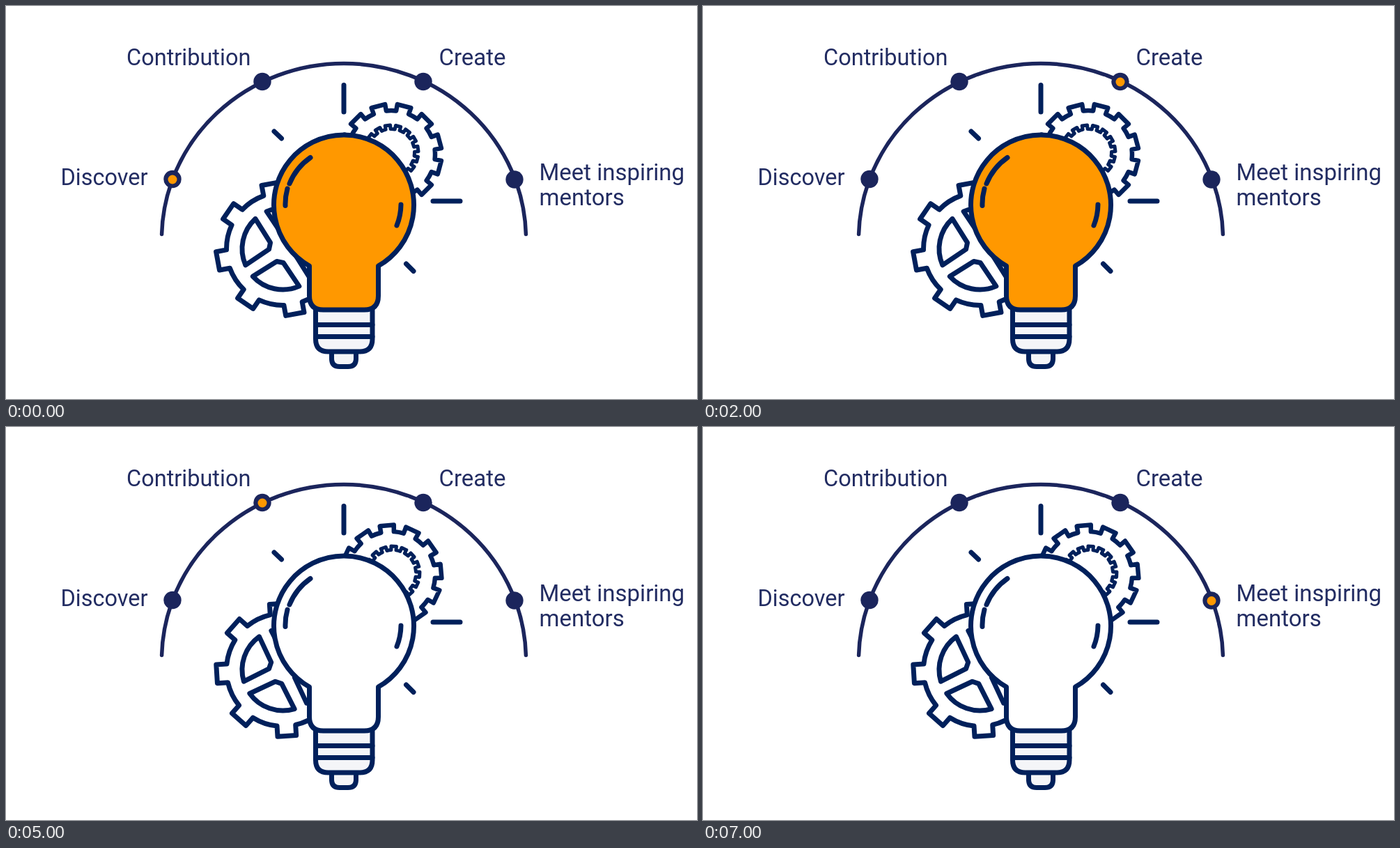
An HTML page for the animation above (8 s loop, 992x564 px).

```html
<!DOCTYPE html>
<html lang="en">
<head>
<meta charset="utf-8">
<title>Bulb and gears</title>
<style>
  html, body { margin: 0; width: 100%; height: 100%; overflow: hidden; background: #fff; }
  svg { display: block; }
  text { font: 33px Roboto, sans-serif; fill: #222c62; }
  .snug { font-size: 32.5px; }
  .ink { fill: none; stroke: #00205b; stroke-width: 7; stroke-linecap: round; stroke-linejoin: round; }
  .gear { fill: #fff; }
  #small { stroke-width: 6.5; }
  #hub { stroke-width: 5; }
</style>
</head>
<body>
<svg width="992" height="564" viewBox="0 0 992 564">
  <path d="M223.6 327.5A261.5 252 0 0 1 746.4 327.5" fill="none" stroke="#1b255c" stroke-width="5.5" stroke-linecap="round"/>
  <g id="dots"></g>
  <circle id="lit" r="6.5" fill="#ff9800"/>

  <text class="snug" x="173" y="85">Contribution</text>
  <text x="621.5" y="85">Create</text>
  <text class="snug" x="78.500" y="257">Discover</text>
  <text x="765.5" y="249.5">Meet inspiring</text>
  <text x="765.5" y="286">mentors</text>

  <path class="ink" d="M485 113.500V152M385 180l10.500 10M613 280H652M574.500 370l10.500 10.500"/>

  <path id="small" class="ink gear"/>
  <path id="hub" class="ink gear"/>
  <path id="big" class="ink gear"/>
  <path id="holes" class="ink gear"/>

  <path class="ink" style="fill:#f4f5f8" d="M467.500 497V506Q467.500 517.500 479 517.500H491Q502.500 517.500 502.500 506V497"/>
  <path class="ink" style="fill:#f4f5f8" d="M444.500 436V478Q444.500 496 462.500 496H508Q526 496 526 478V436"/>
  <path class="ink" d="M445 457.500H526M445 474.500H526"/>
  <path id="bulb" class="ink" d="M435.500 373A100.500 100.500 0 1 1 534.500 373V416Q534.500 436 514.500 436H455.500Q435.500 436 435.500 416Z"/>
  <path class="ink" d="M437 217.500A84 84 0 0 0 407 255M404 262A84 84 0 0 0 401 286.500M567 285A82 82 0 0 1 561 315"/>
</svg>
<script>
  const $ = id => document.getElementById(id);
  const SMALL = [553, 213], BIG = [397.5, 348.5];
  const STOPS = [[239, 248.5], [368, 108.5], [599, 108.5], [730, 249]];
  const STEP = 1000;

  const polar = ([x, y], r, deg) => {
    const a = deg * Math.PI / 180;
    return (x + r * Math.cos(a)).toFixed(2) + ' ' + (y + r * Math.sin(a)).toFixed(2);
  };

  // Toothed outline: half angles in degrees at tooth root and tip.
  function gear(c, teeth, root, tip, rootHalf, tipHalf, turn) {
    let d = '';
    for (let i = 0; i < teeth; i++) {
      const a = turn + i * 360 / teeth;
      d += (i ? `A${root} ${root} 0 0 1 ` : 'M') + polar(c, root, a - rootHalf) +
        'L' + polar(c, tip, a - tipHalf) +
        'L' + polar(c, tip, a + tipHalf) +
        'L' + polar(c, root, a + rootHalf);
    }
    return d + `A${root} ${root} 0 0 1 ` + polar(c, root, turn - rootHalf) + 'Z';
  }

  function spokes(c, turn) {
    let d = '';
    for (let i = 0; i < 4; i++) {
      const a = turn + i * 90;
      d += 'M' + polar(c, 20, a - 14) + 'L' + polar(c, 58.5, a - 35.5) +
        'A58.5 58.5 0 0 1 ' + polar(c, 58.5, a + 35.5) + 'L' + polar(c, 20, a + 14) + 'Z';
    }
    return d;
  }

  $('dots').innerHTML = STOPS.map(([x, y]) =>
    `<circle cx="${x}" cy="${y}" r="12.7" fill="#1b255c"/>`).join('');

  let shown = -1;
  function draw(step) {
    if (step === shown) return;
    shown = step;
    const on = step % 2 === 0;
    const smallTurn = on ? 15 : 25, bigTurn = on ? 79.5 : 86.5;
    const hubAt = [SMALL[0] + (on ? 0 : 2), SMALL[1] - 3];
    $('lit').setAttribute('cx', STOPS[step][0]);
    $('lit').setAttribute('cy', STOPS[step][1] + 0.5);
    $('small').setAttribute('d', gear(SMALL, 12, 63, 72.5, 8.5, 8, smallTurn));
    $('hub').setAttribute('d', gear(hubAt, 16, 33.5, 39, 6, 5.5, smallTurn));
    $('big').setAttribute('d', gear(BIG, 8, 81, 96, 9.5, 8, bigTurn));
    $('holes').setAttribute('d', spokes(BIG, bigTurn + 22.5));
    $('bulb').style.fill = on ? '#ff9800' : '#fff';
  }

  const start = performance.now();
  function tick() {
    draw(Math.floor((performance.now() - start) / STEP) % STOPS.length);
    requestAnimationFrame(tick);
  }
  tick();
</script>
</body>
</html>
```
